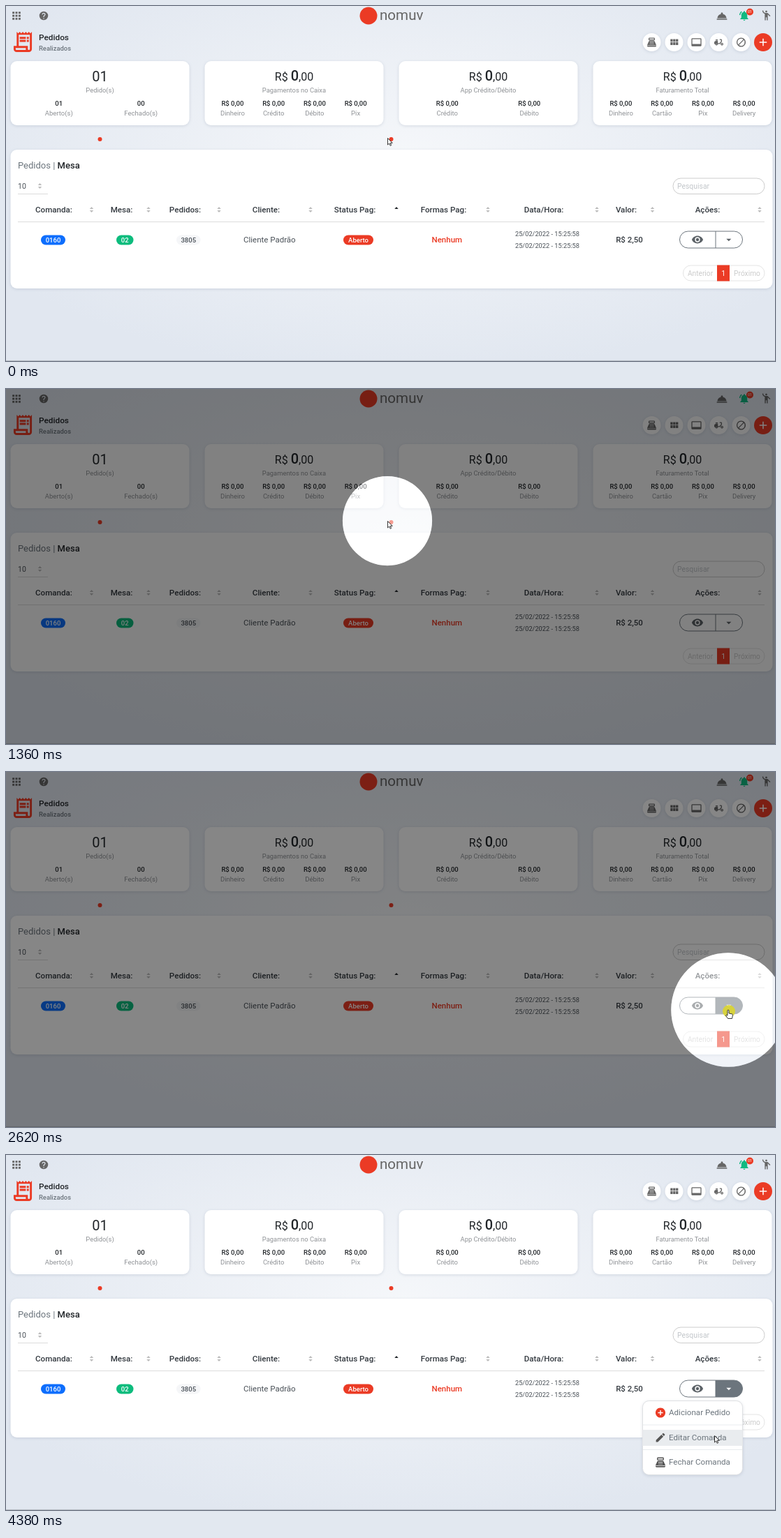
Animation, 1101 px wide and 509 px high, one loop 4450 ms. Source, as an HTML page:

```html
<!DOCTYPE html>
<html lang="pt">
<head>
<meta charset="utf-8">
<style>
html, body { margin: 0; height: 100%; overflow: hidden; }
svg { display: block; width: 1101px; height: 509px; font-family: Roboto, sans-serif; }
.box { fill: #fff; filter: drop-shadow(0 1px 2px rgba(60, 80, 110, .16)); }
</style>
</head>
<body>
<svg id="stage" viewBox="0 0 1101 509"></svg>
<script>
const RED = '#eb3b25', GRAY = '#6c757d', DARK = '#212529', ICON = '#666';

const PATHS = {
  apps: 'M4 8h4V4H4zM10 20h4v-4h-4zM4 20h4v-4H4zM4 14h4v-4H4zM10 14h4v-4h-4zM16 4v4h4V4zM10 8h4V4h-4zM16 14h4v-4h-4zM16 20h4v-4h-4z',
  help: 'M12 2a10 10 0 1 0 0 20a10 10 0 1 0 0-20zm1 17h-2v-2h2zm2.07-7.75l-.9.92C13.45 12.9 13 13.5 13 15h-2v-.5c0-1.1.45-2.1 1.17-2.83l1.24-1.26c.37-.36.59-.86.59-1.41 0-1.1-.9-2-2-2s-2 .9-2 2H8a4 4 0 0 1 8 0c0 .88-.36 1.68-.93 2.25z',
  cloche: 'M2 17h20v2H2zM13.84 7.79A2 2 0 1 0 10.16 7.79C6.25 8.6 3.27 11.93 3 16h18c-.27-4.07-3.25-7.4-7.16-8.21z',
  bell: 'M7.58 4.08L6.15 2.65C3.75 4.48 2.17 7.3 2.03 10.5h2c.15-2.65 1.51-4.97 3.55-6.42zM19.97 10.5h2c-.15-3.2-1.73-6.02-4.12-7.85l-1.42 1.43c2.02 1.45 3.39 3.77 3.54 6.42zM18 11c0-3.07-1.64-5.64-4.5-6.32V4a1.5 1.5 0 0 0-3 0v.68C7.63 5.36 6 7.92 6 11v5l-2 2v1h16v-1l-2-2zM10 20a2 2 0 0 0 4 0z',
  person: 'M12 2a2 2 0 1 0 .01 0zM15.89 8.11C15.5 7.72 14.83 7 13.53 7h-2.54C8.24 7 6 4.75 6 2H4c0 3.16 2.11 5.84 5 6.71V22h2v-6h2v6h2V10.05L18.95 14l1.41-1.41z',
  receipt: 'M19.5 3.5L18 2l-1.5 1.5L15 2l-1.5 1.5L12 2l-1.5 1.5L9 2 7.5 3.5 6 2v14H3v3c0 1.66 1.34 3 3 3h12c1.66 0 3-1.34 3-3V2zM15 20H6c-.55 0-1-.45-1-1v-1h10zM19 19c0 .55-.45 1-1 1s-1-.45-1-1v-3H8V5h11zM9 7h6v2H9zM16 7h2v2h-2zM9 10h6v2H9zM16 10h2v2h-2z',
  till: 'M17 2H7a2 2 0 0 0-2 2v2a2 2 0 0 0 2 2h10a2 2 0 0 0 2-2V4a2 2 0 0 0-2-2zm0 4H7V4h10zM20 22H4a2 2 0 0 1-2-2v-1h20v1a2 2 0 0 1-2 2zM18.53 10.19A2 2 0 0 0 16.7 9H7.3a2 2 0 0 0-1.83 1.19L2 18h20zM8 11h2v1H8zM8 13h2v1H8zM8 15h2v1H8zM11 11h2v1h-2zM11 13h2v1h-2zM11 15h2v1h-2zM14 11h2v1h-2zM14 13h2v1h-2zM14 15h2v1h-2z',
  module: 'M4 11h5V5H4zM4 18h5v-6H4zM10 18h5v-6h-5zM16 18h5v-6h-5zM10 11h5V5h-5zM16 5v6h5V5z',
  screen: 'M21 3H3a2 2 0 0 0-2 2v14a2 2 0 0 0 2 2h18a2 2 0 0 0 2-2V5a2 2 0 0 0-2-2zm0 13H3V5h18z',
  scooter: 'M19 7a2 2 0 0 0-2-2h-3v2h3v2.65L13.52 14H10V9H6a4 4 0 0 0-4 4v3h2a3 3 0 0 0 6 0h4.48L19 10.35zM7 17a1 1 0 0 1-1-1h2a1 1 0 0 1-1 1zM5 6h5v2H5zM19 13a3 3 0 1 0 .01 0zM19 17a1 1 0 1 1 .01 0z',
  block: 'M12 2a10 10 0 1 0 .01 0zM4 12a8 8 0 0 1 12.9-6.31L5.69 16.9A8 8 0 0 1 4 12zM12 20a8 8 0 0 1-4.9-1.69L18.31 7.1A8 8 0 0 1 12 20z',
  plus: 'M19 13h-6v6h-2v-6H5v-2h6V5h2v6h6z',
  addCircle: 'M12 2a10 10 0 1 0 .01 0zM17 13h-4v4h-2v-4H7v-2h4V7h2v4h4z',
  eye: 'M12 4.5C7 4.5 2.73 7.61 1 12c1.73 4.39 6 7.5 11 7.5s9.27-3.11 11-7.5c-1.73-4.39-6-7.5-11-7.5zM12 17a5 5 0 1 1 0-10a5 5 0 0 1 0 10zM12 9a3 3 0 1 0 0 6a3 3 0 0 0 0-6z',
  pencil: 'M3 17.25V21h3.75L17.81 9.94l-3.75-3.75zM20.71 7.04a1 1 0 0 0 0-1.41l-2.34-2.34a1 1 0 0 0-1.41 0l-1.83 1.83 3.75 3.75z'
};

const text = (x, y, size, fill, str, weight = 400, anchor = 'middle') =>
  `<text x="${x}" y="${y}" font-size="${size}" fill="${fill}" font-weight="${weight}" text-anchor="${anchor}">${str}</text>`;
const left = (x, y, size, fill, str, weight) => text(x, y, size, fill, str, weight, 'start');
const rect = (x, y, w, h, r, attrs) => `<rect x="${x}" y="${y}" width="${w}" height="${h}" rx="${r}" ${attrs}/>`;
const dot = (x, y, r, attrs) => `<circle cx="${x}" cy="${y}" r="${r}" ${attrs}/>`;
const icon = (name, cx, cy, size, fill = ICON) =>
  `<path transform="translate(${cx - size / 2} ${cy - size / 2}) scale(${size / 24})" fill="${fill}" fill-rule="evenodd" d="${PATHS[name]}"/>`;
const sorter = (x, y, up = '#bbb', down = '#bbb') =>
  `<path d="M${x - 2.7} ${y - 1}h5.4l-2.7-3z" fill="${up}"/><path d="M${x - 2.7} ${y + 1}h5.4l-2.7 3z" fill="${down}"/>`;
const pill = (x, w, fill, str, color = '#fff') =>
  rect(x, 328.5, w, 14, 7, `fill="${fill}"`) + text(x + w / 2, 338.8, 9.5, color, str, 500);

function card(x, title, cols) {
  const mid = x + 128, money = title != 'Pedido(s)';
  const big = money
    ? text(mid, 107, 16, DARK, 'R$ <tspan font-size="20" font-weight="500">0</tspan>,00')
    : text(mid, 108, 20, DARK, '01');
  return rect(x, 79, 256, 92, 9, 'class="box"') + big + text(mid, 124, 9.4, '#8f9296', title) +
    cols.map((label, i) => {
      const cx = x + 10.5 + (i + .5) * 235 / cols.length;
      return text(cx, 143.3, 9.5, DARK, money ? 'R$ 0,00' : '0' + (1 - i), 500) +
        text(cx, 156.8, 9.5, '#8f9296', label);
    }).join('');
}

function header() {
  const tools = ['till', 'module', 'screen', 'scooter', 'block'];
  return icon('apps', 15, 14, 17.6) + icon('help', 54, 14, 15) +
    dot(519, 14, 12.5, `fill="${RED}"`) + left(535, 20, 20.6, '#666', 'nomuv') +
    icon('cloche', 1025, 14.5, 17.6) + icon('bell', 1057, 14, 17, '#12b981') +
    dot(1065, 8.5, 5, `fill="${RED}"`) + text(1065, 10.4, 5.5, '#fff', '01') +
    icon('person', 1088.5, 13.5, 17) +
    icon('receipt', 24, 51.5, 34.8, RED) +
    left(47, 49.3, 11.8, DARK, 'Pedidos', 500) + left(47, 64, 9.4, GRAY, 'Realizados', 500) +
    tools.map((name, i) => dot(924.5 + 32 * i, 52, 13, 'class="box"') + icon(name, 924.5 + 32 * i, 52, 15.6)).join('') +
    dot(1084, 52, 13, `fill="${RED}"`) + icon('plus', 1084, 52, 18, '#fff');
}

function panel() {
  const heads = [['Comanda:', 68.5, 122.5], ['Mesa:', 165.5, 204], ['Pedidos:', 256.5, 305],
    ['Cliente:', 372.5, 436], ['Status Pag:', 499.5, 559], ['Formas Pag:', 626.5, 690],
    ['Data/Hora:', 770, 846], ['Valor:', 888, 925.5], ['Ações:', 1004.5, 1079]];
  const stamp = '25/02/2022 - 15:25:58';
  return rect(6.5, 206, 1091, 199, 9, 'class="box"') +
    left(17, 233, 13, GRAY, `Pedidos | <tspan fill="${DARK}" font-weight="500">Mesa</tspan>`) +
    left(17, 262, 10.5, '#495057', '10') + sorter(48.5, 258) +
    '<path d="M17 269.5H60M17 309.5H1086" stroke="#dcdcdc"/>' +
    rect(955, 247, 131, 22.5, 11.2, 'fill="#fff" stroke="#ccc"') + left(961, 262, 10.4, '#c2c6ca', 'Pesquisar') +
    heads.map(([s, x, sx]) => text(x, 296, 11.6, '#343a40', s, 500) +
      (sx == 559 ? sorter(sx, 292, DARK, 'none') : sorter(sx, 292))).join('') +
    pill(50, 35, '#0d6efd', '0160') + pill(158, 24.5, '#0cbc7d', '02') +
    pill(244, 34.5, '#f5f6f8', '3805', '#495057') + pill(483, 43, RED, 'Aberto') +
    text(377.3, 339, 11.5, '#495057', 'Cliente Padrão') +
    text(631.3, 339, 11.5, RED, 'Nenhum', 500) +
    text(775, 330, 9.25, '#495057', stamp) + text(775, 347, 9.25, '#495057', stamp) +
    text(892.5, 339, 11.5, '#343a40', 'R$ 2,50', 500) +
    '<path id="drop" d="M1016 323h26.5a12 12 0 0 1 0 24h-26.5z"/>' +
    rect(964.5, 323, 90, 24, 12, `fill="none" stroke="${GRAY}"`) +
    `<path d="M1016 323v24" stroke="${GRAY}"/>` + icon('eye', 990, 335, 17.5, '#5c6267') +
    '<path id="caret" d="M1031.3 333.7h7l-3.5 3.6z"/>' +
    rect(969.5, 372, 116.5, 22, 11, 'fill="none" stroke="#e4e4e4"') +
    rect(1018, 371.5, 18, 23, 0, `fill="${RED}"`) +
    text(994, 386.5, 10.2, '#cbcbcb', 'Anterior') + text(1027, 386.5, 10.2, '#fff', '1') +
    text(1061, 386.5, 10.2, '#cbcbcb', 'Próximo');
}

function menu() {
  const rows = [['addCircle', RED, 'Adicionar Pedido'], ['pencil', '#555', 'Editar Comanda'], ['till', '#555', 'Fechar Comanda']];
  return '<g id="menu">' +
    rect(911.5, 352.5, 143, 106, 9, 'class="box" stroke="#dfe1e3"') +
    rect(911.5, 394, 143, 23, 0, 'id="hover" fill="#e9ecef"') +
    '<path d="M912 387H1054M912 422.5H1054" stroke="#e9ecef"/>' +
    rows.map(([name, color, s], i) => icon(name, 937, 369.5 + 35.6 * i, 17, color) +
      left(949, 373 + 35.6 * i, 11.6, GRAY, s)).join('') + '</g>';
}

const stage = document.getElementById('stage');
stage.innerHTML = `<radialGradient id="sky" cx=".52" cy=".42" r=".62">
  <stop offset="0" stop-color="#f5f7fa"/><stop offset="1" stop-color="#e1e7f0"/></radialGradient>` +
  rect(0, 0, 1101, 509, 0, 'fill="url(#sky)"') + '<path d="M0 508.5H1101" stroke="#b9bfc6"/>' + header() +
  card(6.5, 'Pedido(s)', ['Aberto(s)', 'Fechado(s)']) +
  card(284.5, 'Pagamentos no Caixa', ['Dinheiro', 'Crédito', 'Débito', 'Pix']) +
  card(562.5, 'App Crédito/Débito', ['Crédito', 'Débito']) +
  card(840.5, 'Faturamento Total', ['Dinheiro', 'Cartão', 'Pix', 'Delivery']) +
  dot(134.5, 191, 3, `fill="${RED}"`) + dot(551.5, 191, 3, `fill="${RED}"`) +
  panel() + menu() +
  '<path id="shade" fill-rule="evenodd"/><circle id="glow" fill="#fff"/>' +
  dot(1035, 343, 9, 'id="click" fill="#dad530" fill-opacity=".9"') +
  `<g id="cursor" stroke="#222" stroke-width=".9" stroke-linejoin="round" fill="#fff">
    <path id="arrow" d="M.5.5V10L2.7 8 4.2 11.3 5.7 10.6 4.2 7.4H7.2z"/>
    <path id="hand" d="M-1 1.2Q-1 .2 0 .2T1 1.2V5L5.5 6Q6.6 6.3 6.5 7.6L5.5 12.5H-.5L-3.6 8Q-3.2 6.4-1 8.2z"/></g>`;

const el = id => document.getElementById(id);
const set = (id, attrs) => { for (const k in attrs) el(id).setAttribute(k, attrs[k]); };
const show = (id, on) => { el(id).style.display = on ? '' : 'none'; };
const clamp = v => Math.min(1, Math.max(0, v));
const sine = u => (1 - Math.cos(Math.PI * clamp(u))) / 2;
const cubic = u => u < .5 ? 4 * u ** 3 : 1 - 4 * (1 - u) ** 3;

// Bursts of movement: start, last step, number of steps
const BURSTS = [[1010, 1500, 8], [1680, 2170, 8], [2240, 2700, 7], [2770, 3030, 5], [3190, 3650, 8], [4240, 4380, 3]];
function tick(t) {
  const burst = BURSTS.findLast(b => b[0] <= t);
  if (!burst) return 0;
  const [start, end, n] = burst, step = (end - start) / (n - 1);
  return start + step * Math.min(n - 1, Math.floor((t - start + 4) / step));
}

const glide = t => sine((t - 1590) / 745);
const spot = t => [546 + 488 * glide(t), 189 + 152 * glide(t - 22)];

function pointer(t) {
  if (t < 3100) return spot(t + 45);
  const down = sine((t - 3130) / 520), back = clamp((t - 4170) / 210);
  return [1034 - 78 * down + 58 * back, 341 + 62 * down - back - 11 * Math.sin(Math.PI * back)];
}

function draw(t) {
  const [sx, sy] = spot(t), [px, py] = pointer(t);
  const open = t < 1600 ? (1 - clamp((t - 934) / 553)) ** 3 : cubic(clamp((t - 2530) / 410));
  const r = 58 + 503 * open, alpha = .5 * (1 - open);
  set('shade', {
    d: `M0 0H1101V509H0zM${sx - r} ${sy}a${r} ${r} 0 1 0 ${2 * r} 0a${r} ${r} 0 1 0 ${-2 * r} 0z`,
    'fill-opacity': alpha
  });
  set('glow', { cx: sx, cy: sy, r, 'fill-opacity': alpha });
  show('click', t > 2530 && t < 2730);

  const active = px > 1016 || t > 2800;
  set('drop', { fill: active ? GRAY : 'none' });
  set('caret', { fill: active ? '#fff' : '#5c6267' });

  const row = Math.floor((py - 352) / 35.3);
  show('menu', t > 2800);
  show('hover', row >= 0);
  set('hover', { y: 358.4 + 35.6 * row });

  const hand = px > 964 && py > 323 && t < 3100 || t > 3100 && t < 4300;
  show('hand', hand);
  show('arrow', !hand);
  set('cursor', { transform: `translate(${px} ${py})` });
}

const begin = performance.now();
function frame(now) {
  draw(tick(Math.max(0, now - begin) % 4450));
  requestAnimationFrame(frame);
}
draw(0);
requestAnimationFrame(frame);
</script>
</body>
</html>
```
